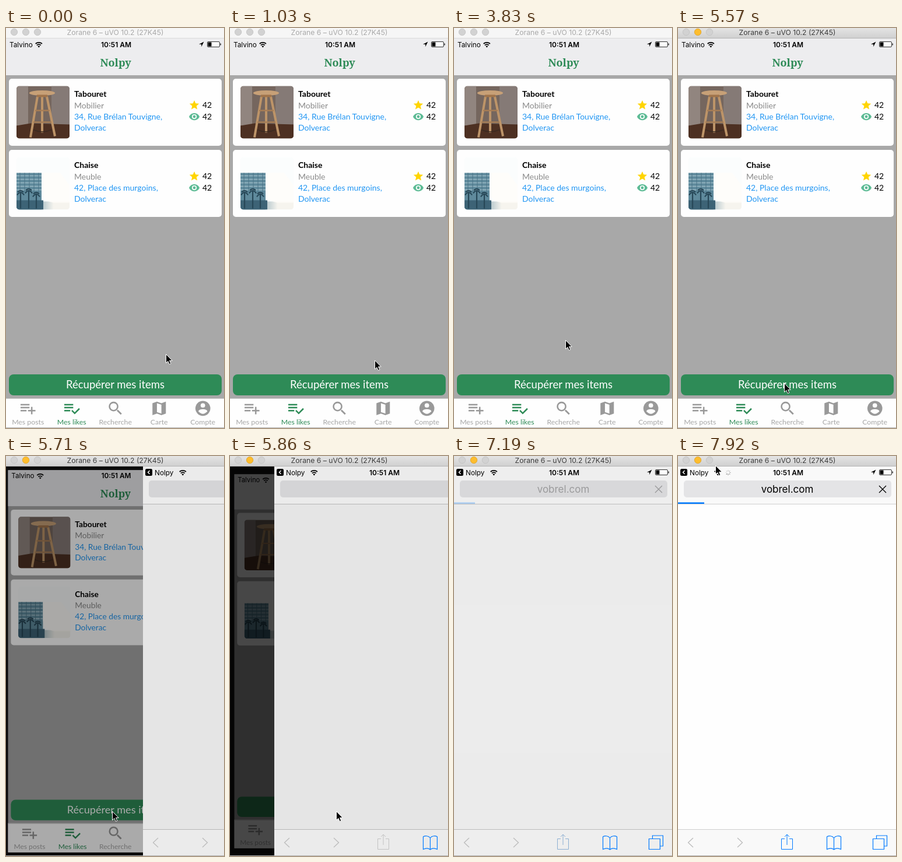
An HTML page that plays this animation: 374x686 px, repeating every 8000 ms.

```html
<!DOCTYPE html>
<html lang="fr">
<head>
<meta charset="utf-8">
<title>Mes likes</title>
<style>
  html, body { margin: 0; width: 100%; height: 100%; overflow: hidden; }
  svg { display: block; }
  text { font: 14px Lato, sans-serif; }
  .system { font-family: Inter, sans-serif; font-size: 11.8px; }
  .clock { font-weight: 600; font-size: 12px; }
  .mid { text-anchor: middle; }
  .line { fill: none; stroke: currentColor; }
  .brand { font: bold 18px "Noto Serif", serif; fill: #2e8b57; }
  .name { font-weight: 700; }
  .tab { font-size: 12.3px; }
</style>
</head>
<body>
<svg id="stage" width="374" height="686" viewBox="0 0 374 686"></svg>
<script>
const LOOP = 8000, STEP = 146.4;
const GREEN = '#2e8b57', BLUE = '#007aff';

const rect = (x, y, w, h, fill, r = 0, extra = '') =>
  `<rect x="${x}" y="${y}" width="${w}" height="${h}" rx="${r}" fill="${fill}" ${extra}/>`;
const text = (x, y, content, cls = '', extra = '') =>
  `<text x="${x}" y="${y}" class="${cls}" ${extra}>${content}</text>`;
const line = (d, color, width = 1) =>
  `<path class="line" d="${d}" color="${color}" stroke-width="${width}"/>`;
const group = (x, y, scale, content, extra = '') =>
  `<g transform="translate(${x} ${y}) scale(${scale})" ${extra}>${content}</g>`;

const wifi = x => group(x, 0, 1,
  line('M-5.6 27a8.2 8.2 0 0 1 11.2 0M-3.4 29.6a5 5 0 0 1 6.8 0', '#000', 1.8) +
  '<path d="M-1.9 31.4a3 3 0 0 1 3.8 0L0 33.6z"/>');

const clockAndBattery =
  text(189, 32.5, '10:51 AM', 'system clock mid') +
  '<path d="M339.5 23.5l-8.5 4.4h4.2v4.4z"/>' +
  rect(345.5, 23.5, 21, 9, '#fdfdfd', 1.5, 'stroke="#333"') +
  rect(346.5, 24.5, 6, 7, '#000') + rect(367.5, 26.5, 1.5, 3, '#333');

const stoolPhoto =
  rect(0, 0, 91, 90, '#75665e') + rect(0, 0, 20, 68, '#91857f') + rect(60, 0, 31, 66, '#857a76') +
  '<path d="M0 68l24-4 67 2v24H0z" fill="#4d3022"/>' +
  line('M36 18L24 88M52 18L66 86M44 16V80', '#bd9468', 4) +
  line('M32 42h25M29 62h31', '#a67d55', 2.5) +
  line('M29 75q15 7 31 0', '#3b2a20', 1.5) +
  '<ellipse cx="44" cy="12" rx="22" ry="4.5" fill="#c7a077"/>' + rect(35, 15, 18, 4, '#a0744b');

const palm = (x, y) => line(`M${x} ${y}V88M${x - 6} ${y + 5}q6-9 12 0M${x - 5} ${y}q5-5 10 0`, '#274757', 2.2);
const cityPhoto =
  '<defs><linearGradient id="glow"><stop offset=".3" stop-color="#7fa1af"/>' +
  '<stop offset=".7" stop-color="#f6f4ee"/></linearGradient></defs>' +
  rect(0, 0, 91, 90, '#fbfdfd') + rect(0, 76, 91, 14, 'url(#glow)') +
  rect(0, 27, 43, 63, '#5f8a9c') +
  line('M0 32h43M0 38h43M0 44h43M0 50h43M0 56h43', '#9dbac6', 1.6) +
  line('M6 27v34M14 27v34M22 27v34M30 27v34M38 27v34', '#4b7385') +
  rect(0, 74, 46, 16, '#3d6376') + palm(7, 60) + palm(21, 57) + palm(34, 63) +
  '<path d="M43 27v32q2 16 20 19h28V48L75 27z" fill="#fffdfa" opacity=".85"/>';

const star = '<path fill="#ffd500" d="M12 17.3L18.2 21l-1.7-7L22 9.2l-7.2-.6L12 2 9.2 8.6 2 9.2 7.5 14l-1.7 7z"/>';
const eye = '<path fill="#5dbb95" d="M1 12C5 2 19 2 23 12C19 22 5 22 1 12z"/>' +
  '<circle cx="12" cy="12" r="4" fill="#5dbb95" stroke="#fff" stroke-width="2"/>';

const card = (y, photo, name, kind, street) => group(0, y, 1,
  rect(5, 0, 365, 115, '#fefefe', 5) +
  group(18, 12.5, 1, photo, 'clip-path="url(#photo)"') +
  text(117, 31, name, 'name') +
  text(117, 50.5, kind, '', 'fill="#8a8a8a"') +
  text(117, 70, street, '', 'fill="#2196f3"') +
  text(117, 89, 'Dolverac', '', 'fill="#2196f3"') +
  group(313.2, 35.3, .82, star) + group(313.2, 55.2, .82, eye) +
  text(337, 50, '42') + text(337, 70, '42'));

const listLines = 'M2 7h12M2 11h12M2 15h8';
const tabIcons = {
  'Mes posts': line(listLines + 'M17 10v10M12 15h10', 'inherit', 2),
  'Mes likes': line(listLines + 'M12.2 14.8l3.8 3.8 6.3-6.3', 'inherit', 2),
  'Recherche': line('M14.5 14.5l5.3 5.3', 'inherit', 2.2) +
    '<circle class="line" cx="9.5" cy="9.5" r="5.5" stroke-width="2"/>',
  'Carte': '<path fill="currentColor" fill-rule="evenodd" d="M3 5l6-2 6 2.1L21 3v16l-6 2-6-2.1L3 21zM9 5v11.9L15 19V7.1z"/>',
  'Compte': '<circle cx="12" cy="12" r="10" fill="currentColor"/><circle cx="12" cy="8" r="3" fill="#fff"/>' +
    '<path fill="#fff" d="M6 16c0-4 12-4 12 0q-6 6.5-12 0z"/>'
};
const tabs = Object.entries(tabIcons).map(([label, icon], i) => {
  const x = 37.7 + i * 75, selected = i === 1;
  return group(x - 15.3, 637, 1.28, icon, `color="${selected ? GREEN : '#999'}"`) +
    text(x, 680, label, 'tab mid', `fill="${selected ? GREEN : '#a6a6a6'}"`);
}).join('');

const app =
  rect(0, 18, 374, 668, '#a8a8a8') + rect(0, 18, 374, 63, '#ededef') +
  text(6, 32.5, 'Talvino', 'system') + wifi(56.3) + clockAndBattery +
  text(188, 66, 'Nolpy', 'brand mid') +
  card(87, stoolPhoto, 'Tabouret', 'Mobilier', '34, Rue Brélan Touvigne,') +
  card(209, cityPhoto, 'Chaise', 'Meuble', '42, Place des murgoins,') +
  rect(5, 594, 365, 36, GREEN, 8) +
  text(187.5, 618, 'Récupérer mes items', 'mid', 'fill="#fff" style="font-size:18.5px"') +
  rect(0, 635, 374, 51, '#fefefe') + rect(0, 635, 374, 1, '#c8c8c8') + tabs;

const browserBase = (bar, page, field, edge) =>
  rect(0, 18, 374, 64, bar) + rect(0, 83, 374, 557, page) + rect(0, 82, 374, 1, edge) +
  rect(10, 42, 356, 29, field, 5) + rect(0, 640, 374, 46, bar) + rect(0, 640, 374, 1, edge);
const share = color => line('M183 656.5h-5.5v18h19v-18h-5.5M187 667v-17.5M183 653l4-4 4 4', color);
const spinner = [0, 1, 2, 3, 4, 5, 6, 7].map(i =>
  `<path d="M0 -2.2V-4.5" stroke="#777" opacity="${.25 + i * .1}" transform="rotate(${i * 45})"/>`).join('');

const browser =
  browserBase('#ebebeb', '#e5e5e5', '#d4d4d6', '#b6b6b6') + share('#c2c2c2') +
  '<g id="live">' + browserBase('#f9f9f9', '#fefefe', '#e4e4e6', '#cfcfcf') + share(BLUE) +
  text(187.5, 63, 'vobrel.com', 'system mid', 'style="font-size:17px"') +
  line('M345 51l12 12M357 51l-12 12', '#000', 1.4) +
  rect(0, 79.5, 0, 2.5, BLUE, 0, 'id="progress"') + '</g>' +
  rect(4, 22, 12, 12, '#000', 2.5) + line('M11.5 25l-3 3 3 3', '#fff', 1.5) +
  text(20, 32.5, 'Nolpy', 'system') + wifi(68.3) + clockAndBattery +
  '<g id="spinner">' + spinner + '</g>' +
  line('M26 655l-8.5 8 8.5 8M102 655l8.5 8-8.5 8', '#bcbcbc', 1.3) +
  line('M267.5 655c-3-4-9-4-12-2v21.5c4-2 9-2 12 .5c3-2.5 8-2.5 12-.5v-21.5c-3-2-9-2-12 2v20', BLUE, 1.2) +
  line('M334.5 656.5h19v18h-19zM340.5 656v-5h18v18h-5', BLUE, 1.2);

const titleBar = (fill, edge, ink, buttons) =>
  rect(0, 0, 374, 18, fill) + rect(0, 17, 374, 1, edge) +
  buttons.map(([color, ring], i) =>
    `<circle cx="${14 + i * 20}" cy="7" r="5.7" fill="${color}" stroke="${ring}" stroke-width=".8"/>`).join('') +
  text(187.5, 11.8, 'Zorane 6 – uVO 10.2 (27K45)', 'system mid', `fill="${ink}" style="font-size:12.2px"`);
const dull = ['#d2d2d2', '#c0c0c0'], amber = ['#fdbd2e', '#dfa023'];

const $ = id => document.getElementById(id);
$('stage').innerHTML =
  '<defs><clipPath id="photo">' + rect(0, 0, 91, 90, '#000', 5) + '</clipPath>' +
  '<linearGradient id="chrome" x2="0" y2="1"><stop stop-color="#e4e4e4"/><stop offset="1" stop-color="#cfcfcf"/></linearGradient></defs>' +
  rect(0, 0, 374, 686, '#101010') +
  `<g id="app">${app}</g>` + rect(0, 18, 374, 668, '#000', 0, 'id="dim"') +
  `<g id="browser">${browser}</g>` +
  `<g id="inactive">${titleBar('#f6f6f6', '#dadada', '#a9a9a9', [dull, dull, dull])}</g>` +
  `<g id="active">${titleBar('url(#chrome)', '#b4b4b4', '#3c3c3c', [dull, amber, dull])}</g>` +
  rect(0, 685, 374, 1, '#b0b0b0') +
  '<path id="cursor" d="M0 0V15l3.4-3.1 2.4 5.3 2.5-1.1-2.3-5.2h4.7z" stroke="#fff"/>';

// Keys are [step, ...values]; values between keys are interpolated.
const cursorKeys = [
  [0, 274.5, 559.5], [3, 262, 566], [7, 248.5, 570], [12, 248.5, 570], [14, 290, 540], [15, 300, 490],
  [17, 262, 400], [18, 228.5, 346.5], [19, 195.5, 222.5], [20, 207.5, 256.5], [21, 220, 276],
  [23, 220, 276], [25, 200, 460], [26, 191.5, 535.5], [28, 160, 610], [30, 142.5, 621],
  [34, 142.5, 621], [36, 182.5, 609.5], [45, 182.5, 609.5], [46, 150, 520], [48, -20, 250],
  [52, -20, 30], [53, 36.5, 12.5], [54, 64.5, 16.5]
];
const slideKeys = [[38, 374], [39, 235], [40, 76], [41, 14], [42, 0]];
const fadeKeys = [[47, 0], [49, .27], [50, .6], [52, 1]];

function sample(keys, step) {
  const next = keys.findIndex(key => key[0] >= step);
  if (next < 0) return keys.at(-1).slice(1);
  if (next === 0) return keys[0].slice(1);
  const a = keys[next - 1], b = keys[next];
  const mix = (step - a[0]) / (b[0] - a[0]);
  return a.slice(1).map((value, i) => value + (b[i + 1] - value) * mix);
}

const show = (id, visible) => $(id).setAttribute('visibility', visible ? 'visible' : 'hidden');
const move = (id, transform) => $(id).setAttribute('transform', transform);

function draw(time) {
  const step = Math.floor((time % LOOP + 5) / STEP);
  const [slide] = sample(slideKeys, step);
  const covered = 1 - slide / 374;

  move('app', `translate(187 352) scale(${1 - covered * .05}) translate(-187 -352)`);
  $('dim').setAttribute('opacity', covered * .9);
  move('browser', `translate(${slide} 0)`);
  show('browser', slide < 374);
  $('live').setAttribute('opacity', sample(fadeKeys, step)[0]);
  $('progress').setAttribute('width', Math.max(0, 36 + (step - 49) * 1.8));
  move('spinner', `translate(86 28.5) rotate(${step * 45})`);
  show('spinner', step >= 51);
  show('inactive', step < 28);
  show('active', step >= 28);
  move('cursor', `translate(${sample(cursorKeys, step).join(' ')})`);
}

function tick() {
  draw(performance.now());
  requestAnimationFrame(tick);
}
tick();
</script>
</body>
</html>
```
